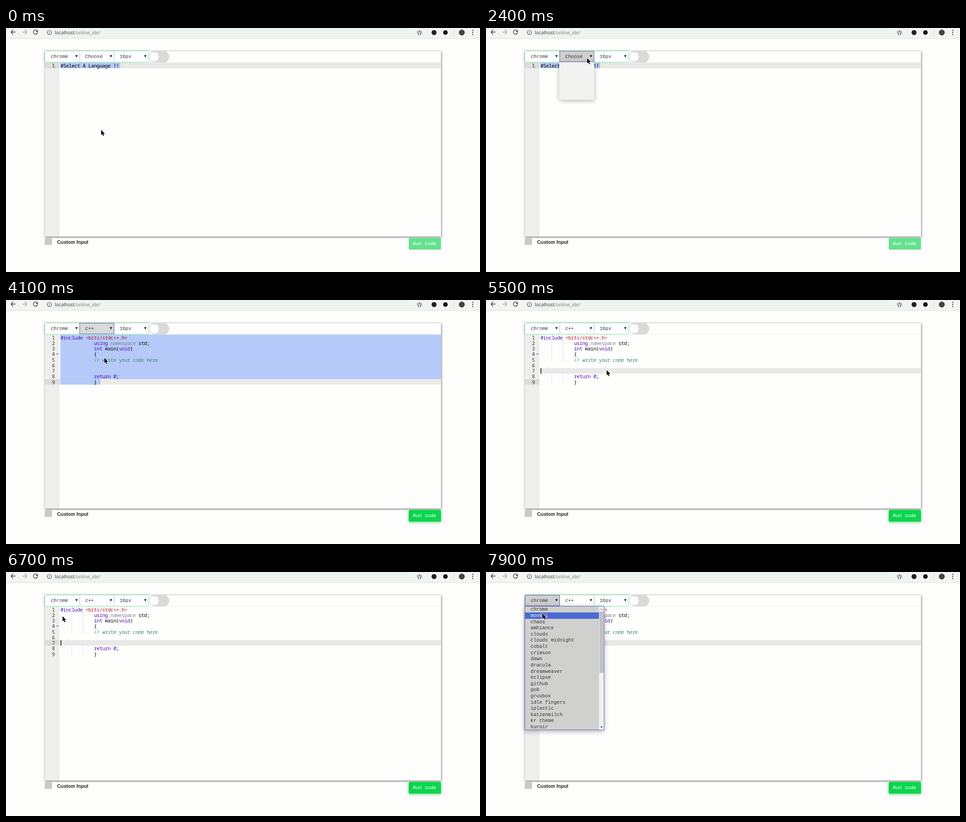
An HTML page with a canvas that plays this animation: 1042x537 px, repeating every 8000 ms.

```html
<!DOCTYPE html>
<html lang="en">
<head>
<meta charset="utf-8">
<title>Online IDE</title>
<style>
  html, body { margin: 0; width: 100%; height: 100%; overflow: hidden; background: #fefefd; }
  canvas { display: block; }
</style>
</head>
<body>
<canvas width="1042" height="537"></canvas>
<script>
const ctx = document.querySelector('canvas').getContext('2d');
const LOOP = 8000, STEP = 100;
const MONO = '10.67px "Liberation Mono", monospace';
const CODE = '11px "Noto Sans Mono", monospace';
const URL_FONT = '10.3px "Open Sans", sans-serif';
const COL = 6.12, ROW = 12.24, TEXT_X = 119.7, TOP = 76.2;
const OPTION = 13.62, MENU_TOP = 75;
const BLUE = '#5c6dbb', GREEN = 'rgba(13,207,85,.65)', SELECTED = '#b5caf9', ACTIVE = '#e9e9e8';

const LANGUAGES = ['Choose', 'js', 'c', 'c++', 'python2', 'python3'];
const THEMES = ['chrome', 'monkai', 'chaos', 'ambiance', 'clouds', 'clouds midnight', 'cobalt',
  'crimson', 'dawn', 'dracula', 'dreamweaver', 'eclipse', 'github', 'gob', 'gruvbox',
  'idle fingers', 'iplastic', 'katzenmilch', 'kr theme', 'kuroir'];

const INK = { k: '#4a0cb8', s: '#b01230', g: '#80808a', c: '#3a8f5a', n: '#2a10c8', t: '#000' };
// Each line: indent, then pairs of ink and text.
const PROGRAM = [
  [0, 'k', '#include ', 's', '<bits/stdc++.h>'],
  [12, 'k', 'using ', 'g', 'namespace ', 't', 'std;'],
  [12, 'k', 'int ', 't', 'main(', 'k', 'void', 't', ')'],
  [12, 't', '{'],
  [12, 'c', '// write your code here'],
  [0], [0],
  [12, 'k', 'return ', 'n', '0', 't', ';'],
  [12, 't', '}']
];
const PROMPT = [[0, 't', '#Select A Language !!']];

// Pointer moves: first step, last step, end point.
const START = [209, 224];
const MOVES = [
  [700, 800, 245, 114], [1200, 1400, 230, 79], [1500, 1500, 239, 86], [1800, 2000, 222, 66],
  [2800, 3200, 215, 126], [3600, 3600, 216, 127], [4200, 4300, 290, 132], [4500, 4600, 265, 151],
  [4800, 4800, 265, 154], [6200, 6300, 184, 158], [6500, 6700, 124, 97], [7100, 7200, 124, 74],
  [7700, 7900, 124, 91]
];

function pointerAt(t) {
  let [x, y] = START;
  for (const [first, last, toX, toY] of MOVES) {
    if (t < first) break;
    const p = Math.min(1, (t - first + STEP) / (last - first + STEP));
    x += (toX - x) * p;
    y += (toY - y) * p;
  }
  return [Math.round(x), Math.round(y)];
}

function box(x, y, w, h, fill, { shadow, blur = 0, dy = 0, radius = 0, border } = {}) {
  ctx.save();
  if (shadow) Object.assign(ctx, { shadowColor: shadow, shadowBlur: blur, shadowOffsetY: dy });
  ctx.fillStyle = fill;
  ctx.beginPath();
  ctx.roundRect(x, y, w, h, radius);
  ctx.fill();
  ctx.restore();
  if (border) {
    ctx.strokeStyle = border;
    ctx.lineWidth = 1;
    ctx.strokeRect(x + .5, y + .5, w - 1, h - 1);
  }
}

function text(str, x, baseline, color, font = MONO, spacing = 0) {
  ctx.font = font;
  ctx.letterSpacing = spacing + 'px';
  ctx.fillStyle = color;
  ctx.fillText(str, x, baseline);
}

function shape(d, { x = 0, y = 0, fill, stroke, width = 1.5 }) {
  const path = new Path2D(d);
  ctx.save();
  ctx.translate(x, y);
  ctx.lineWidth = width;
  if (stroke) { ctx.strokeStyle = stroke; ctx.stroke(path); }
  if (fill) { ctx.fillStyle = fill; ctx.fill(path); }
  ctx.restore();
}

function dot(x, y, r, fill) {
  box(x - r, y - r, 2 * r, 2 * r, fill, { radius: r });
}

function drawBrowser() {
  box(0, 0, 1042, 23, '#f1f4f2');
  box(84, -4, 838, 26, '#eef3f1', { radius: 13 });
  box(0, 23, 1042, 1, '#dfe2e0');
  const arrow = 'M0 0H10M5 -5L0 0L5 5';
  shape(arrow, { x: 11, y: 9, stroke: '#444' });
  ctx.save();
  ctx.scale(-1, 1);
  shape(arrow, { x: -46, y: 9, stroke: '#aaa' });
  ctx.restore();
  shape('M3.6 -3A4.7 4.7 0 1 0 4.6 1', { x: 65, y: 9, stroke: '#444' });
  shape('M5 -5V0H0Z', { x: 65, y: 9, fill: '#444' });
  shape('M-4.7 0A4.7 4.7 0 1 1 4.7 0A4.7 4.7 0 1 1 -4.7 0M0 -.6V2.8M0 -2.8V-1.6', { x: 95.5, y: 10, stroke: '#555', width: 1.1 });
  text('localhost', 107.5, 13.7, '#333', URL_FONT);
  text('/online_ide/', 107.5 + ctx.measureText('localhost').width, 13.7, '#777', URL_FONT);
  shape('M0 -5L1.5 -1.6L5 -1.3L2.3 1L3.1 4.5L0 2.6L-3.1 4.5L-2.3 1L-5 -1.3L-1.5 -1.6Z', { x: 909, y: 10, stroke: '#555', width: 1.1 });
  dot(941, 10, 5.5, '#222');
  dot(966, 10, 5, '#111');
  box(984, 3, 1, 14, '#d4d7d5');
  dot(1002, 10, 6.5, '#444');
  for (const y of [5.5, 10, 14.5]) dot(1026, y, 1.3, '#444');
}

function drawCode(t) {
  const loaded = t >= 4100, cleared = t >= 5500;
  const lines = loaded ? PROGRAM : PROMPT;
  const active = cleared ? 6 : loaded ? 8 : 0;
  const gutterRow = t >= 5900 ? 6 : loaded ? 8 : 0;
  const rowTop = i => TOP + i * ROW;

  box(85, 76, 32.5, 383, '#eeeeed');
  box(85, rowTop(gutterRow), 32.5, ROW, '#dcdcdb');
  box(117.5, rowTop(active), 839, ROW, ACTIVE);
  if (!cleared) {
    const end = loaded ? 206.5 : 250;
    if (loaded) box(119.5, TOP, 837, rowTop(8) - TOP, SELECTED);
    box(119.5, rowTop(active), end - 119.5, ROW, SELECTED);
    box(end - .5, rowTop(active), 1, ROW, '#a3a9b8');
  }
  lines.forEach(([indent, ...parts], i) => {
    const baseline = rowTop(i) + 10.4;
    text(String(i + 1), 101, baseline, '#333', CODE, -.48);
    for (let c = 4; c < indent; c += 4) box(Math.round(TEXT_X + c * COL), rowTop(i), 1, ROW, 'rgba(200,200,200,.55)');
    let column = indent;
    for (let p = 0; p < parts.length; p += 2) {
      text(parts[p + 1], TEXT_X + column * COL, baseline, INK[parts[p]], CODE, -.48);
      column += parts[p + 1].length;
    }
  });
  if (loaded) shape('M-2.5 -1.2H2.5L0 1.6Z', { x: 113, y: 119, fill: '#666' });
  if (cleared && (t < 6200 || t >= 6700)) box(120, rowTop(6), 1.5, ROW, '#000');
}

function drawSelect(x, label, shade = 255, border) {
  box(x, 51, 75.2, 23.5, `rgb(${shade},${shade},${shade})`, { shadow: GREEN, blur: 4, radius: 1 });
  if (border) box(x - .4, 50.5, 76.3, 24.5, 'transparent', { border });
  text(label, x + 12.4, 66, '#333');
  shape('M-2.7 -2.3H2.7L0 2.9Z', { x: x + 69, y: 62, fill: '#222' });
}

// Background shade and border of the language select.
function languageStyle(t) {
  if (t < 1800 || t >= 5500) return [];
  if (t < 2400) return [Math.max(220, 243 - (t - 1800) / 8.5), '#aab0ac'];
  if (t < 4100) return [207, BLUE];
  return [Math.min(255, 217 + (t - 4100) / 5), BLUE];
}

function themeStyle(t) {
  if (t < 7100) return [];
  if (t < 7300) return [t < 7200 ? 238 : 221, '#a9aeab'];
  return [207, BLUE];
}

function drawMenu(x, width, items, ready, pointerY, scrolls) {
  const height = items.length * OPTION + 1.2;
  box(x, MENU_TOP, width, height, ready ? '#d0d0cf' : '#f2f2f1', { shadow: 'rgba(0,0,0,.3)', blur: 10, dy: 2 });
  if (!ready) return;
  const current = Math.max(0, Math.min(items.length - 1, Math.floor((pointerY - MENU_TOP) / OPTION)));
  const inner = width - (scrolls ? 12 : 2);
  items.forEach((item, i) => {
    const y = MENU_TOP + .5 + i * OPTION;
    if (i === current) box(x + 1, Math.round(y), inner, 14, '#4a6ad2');
    text(item, x + 13, y + 9.8, i === current ? '#eef' : '#333');
  });
  if (scrolls) {
    const barX = x + width - 11.5;
    box(barX, MENU_TOP, 11, height, '#f1f1f0');
    box(barX + 1, 87, 9, 135, '#c1c1c1');
    shape('M-3 1.5H3L0 -1.5Z', { x: barX + 5.5, y: 82, fill: '#a3a3a3' });
    shape('M-3 -1.5H3L0 1.5Z', { x: barX + 5.5, y: 341.5, fill: '#505050' });
  }
  box(x, MENU_TOP, width, Math.floor(height), 'transparent', { border: BLUE });
}

function draw(t) {
  const [px, py] = pointerAt(t);
  const chosen = t >= 4100;

  box(0, 0, 1042, 537, '#fefefd');
  drawBrowser();
  box(85.5, 51, 871, 408, '#fefefd', { shadow: 'rgba(0,0,0,.7)', blur: 4, dy: 1 });
  box(85.5, 75, 871, 1, '#ececeb');
  drawCode(t);

  drawSelect(237.3, '16px');
  drawSelect(161.6, chosen ? 'c++' : 'Choose', ...languageStyle(t));
  drawSelect(86, 'chrome', ...themeStyle(t));
  box(315, 50.5, 44, 25.5, '#d9d9d9', { radius: 12.75 });
  dot(326, 63.3, 10.3, '#fefefe');

  box(85.3, 462, 15.7, 15.7, '#c8c8c8');
  text('Custom Input', 112.3, 475, '#222', 'bold 10.7px "Liberation Sans", sans-serif');
  box(885.3, 462, 71, 25.8, chosen ? '#0ad54c' : '#65e18d',
    { radius: 3, ...(chosen && { shadow: 'rgba(11,180,70,.5)', blur: 6, dy: 2 }) });
  text('Run code', 894.8, 478, '#fff');

  if (t >= 2400 && !chosen) drawMenu(161, 77, LANGUAGES, t >= 2800, py, false);
  if (t >= 7200) drawMenu(85, 175, THEMES, t >= 7300, py, true);

  shape('M0 0V11.6L2.6 9.2L4.5 13.6L6.3 12.8L4.5 8.5H8Z', { x: px + .3, y: py + .2, fill: '#000', stroke: '#fff', width: 1.3 });
}

function frame(now) {
  draw(Math.floor(now % LOOP / STEP) * STEP);
  requestAnimationFrame(frame);
}
requestAnimationFrame(frame);
</script>
</body>
</html>
```
